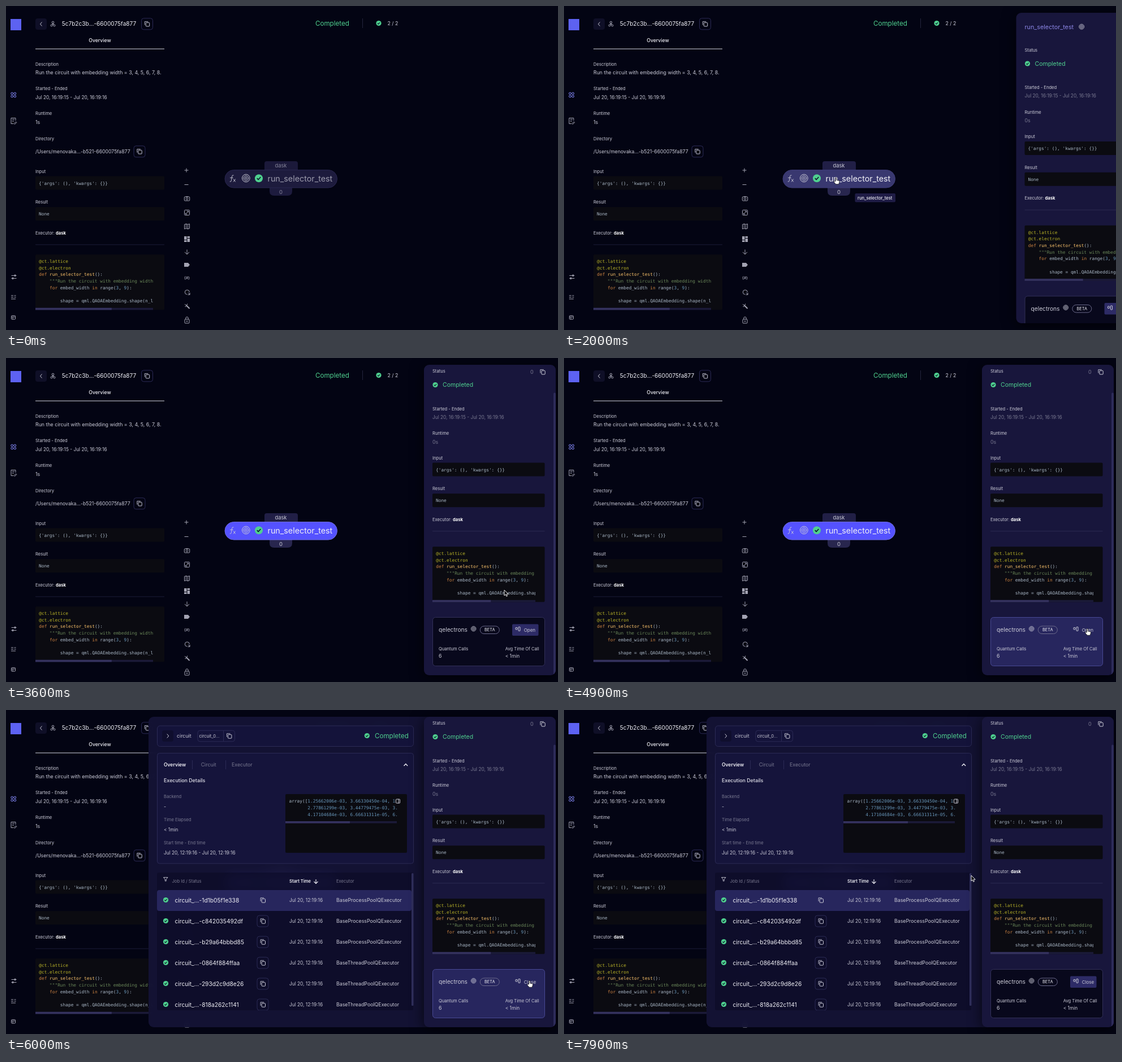
Recreate the animation shown at these times as an HTML page. Size 976x574 px, loop 8000 ms.

```html
<!DOCTYPE html>
<html lang="en">
<head>
<meta charset="utf-8">
<title>Workflow dashboard</title>
<style>
html, body { margin: 0; width: 976px; height: 574px; overflow: hidden; background: #030413; }
body { position: relative; }
svg { display: block; font-family: Inter, sans-serif; }
text { white-space: pre; }
#base, #pane, #panel, #pointer { position: absolute; }
#base, #pointer { left: 0; top: 0; }
#pane, #panel { top: 12px; height: 550px; overflow: hidden; border-radius: 9px; }
#pane { left: 252px; width: 720px; background: rgba(21, 20, 54, .93); backdrop-filter: blur(9px); }
#panel { left: 739px; width: 233px; background: #18163c; box-shadow: 0 4px 24px #000a; }
.mono { font-family: "DejaVu Sans Mono", monospace; fill: #a9b7c6; }
.dec { fill: #bbb529; } .key { fill: #cc8242; } .fn { fill: #ffc66d; }
.str { fill: #6a8759; } .num { fill: #6897bb; }
</style>
</head>
<body>
<svg id="base" width="976" height="574"></svg>
<div id="pane"></div>
<div id="panel"></div>
<svg id="pointer" width="976" height="574"></svg>
<script>
const $ = id => document.getElementById(id);
const WHITE = '#f0f0f6', LIGHT = '#cbcbd7', GRAY = '#797990', GREEN = '#4fd08f', LINE = '#2b2a55', BLACK = '#0b0b11';

// Drawing helpers; y of a text is the middle of its capitals
const text = (x, y, s, size = 8.8, fill = LIGHT, extra = '') =>
  `<text x="${x}" y="${y + size * .36}" font-size="${size}" fill="${fill}" ${extra}>${s}</text>`;
const label = (x, y, s, fill = LIGHT) => text(x, y, s, 7.6, fill);
const mono = (x, y, s) => text(x, y, s, 7.8, '', 'class="mono"');
const rect = (x, y, w, h, fill, r = 0, extra = '') =>
  `<rect x="${x}" y="${y}" width="${w}" height="${h}" rx="${r}" fill="${fill}" ${extra}/>`;
const frame = (x, y, w, h, r = 4, stroke = LINE, fill = 'none') => rect(x, y, w, h, fill, r, `stroke="${stroke}"`);
const path = (d, stroke = '#a3a3b2', w = 1, fill = 'none') =>
  `<path d="${d}" stroke="${stroke}" stroke-width="${w}" fill="${fill}"/>`;
const ring = (x, y, r, stroke = '#a3a3b2', w = 1) =>
  `<circle cx="${x}" cy="${y}" r="${r}" fill="none" stroke="${stroke}" stroke-width="${w}"/>`;
const target = (x, y, r, w = .8) => [1, .63, .27].map(k => ring(x, y, r * k, LIGHT, w)).join('');
const check = (x, y, r = 4.6) => `<circle cx="${x}" cy="${y}" r="${r}" fill="${GREEN}"/>` +
  path(`M${x - r * .45} ${y}l${r * .32} ${r * .34} ${r * .6}-${r * .66}`, '#0c1a2c', r * .24);
const copy = (x, y) => path(`M${x - 4.2} ${y + 1.8}v-6h6`, LIGHT, .9) + frame(x - 2.2, y - 2.4, 6.4, 6.6, 1, LIGHT);
const copyButton = (x, y) => frame(x - 10, y - 10, 20, 20, 4, LINE) + copy(x, y);
const clip = (x, y, w, h, body) => `<svg x="${x}" y="${y}" width="${w}" height="${h}" overflow="hidden">${body}</svg>`;
const tag = (cls, s) => `<tspan class="${cls}">${s}</tspan>`;

const CODE = [
  tag('dec', '@ct.lattice'), tag('dec', '@ct.electron'),
  tag('key', 'def ') + tag('fn', 'run_selector_test') + '():',
  tag('str', '    """Run the circuit with embedding width = 3, 4'),
  `    ${tag('key', 'for')} embed_width ${tag('key', 'in')} range(${tag('num', 3)}, ${tag('num', 9)}):`,
  '', '        shape = qml.QAOAEmbedding.shape(n_layers'];
const scrollBar = (x, y, w, thumb) => rect(x, y, w, 3.6, '#1b1a38') + rect(x, y, thumb, 3.6, '#35325f');
const codeBox = (x, y, w, view) => rect(x, y, w, 98, BLACK, 2) +
  clip(x, y, view, 94, CODE.map((s, i) => mono(6.3, 12 + i * 11.68, s)).join('')) +
  scrollBar(x, y + 94.5, view, view * view / 321);
const runInfo = (x, y, w, view, codeY, lineColor) =>
  label(x, y, 'Input') + rect(x, y + 8.8, w, 24, BLACK, 2) + mono(x + 6, y + 21, "{'args': (), 'kwargs': {}}") +
  label(x, y + 54.7, 'Result') + rect(x, y + 63.5, w, 24, BLACK, 2) + mono(x + 6, y + 75.5, 'None') +
  label(x, y + 109.3, `Executor: <tspan font-weight="700" fill="#fff">dask</tspan>`) +
  rect(x, y + 129.5, w, 1, lineColor) + codeBox(x, codeY, w, view);
const times = (x, y, fill, hour = 16, start = 15) =>
  text(x, y, `Jul 20, ${hour}:19:${start} - Jul 20, ${hour}:19:16`, 8.3, fill);

const sideIcons =
  rect(8, 23, 19, 20, '#5d62f2') +
  [[10.7, 155], [15.8, 155], [10.7, 160], [15.8, 160]].map(([x, y]) => ring(x, y, 1.9, '#8287f5')).join('') +
  path('M17 203v-4.500h-8v10h4M11 201h4M11 204h3M13.500 209l4-4 1.300 1.300-4 3.700') +
  path('M9.500 477.500h9M9.500 482.500h9') + ring(16, 477.5, 1.4) + ring(12, 482.5, 1.4) +
  path('M9 513h4M9 516h4M9 519h8M14.500 513h3M14.500 516h3') +
  frame(9.5, 548.5, 7, 6.5, 1, '#a3a3b2') + path('M9.500 550.800h7M12 551v4');

const toolIcons =
  path('M315.500 291h7M319 287.500v7M315.500 316.500h7') +
  frame(315.3, 338, 9.4, 7, 1, '#a3a3b2') + ring(320, 341.5, 1.8) + path('M318 337.500h4') +
  frame(315.5, 361.5, 9, 9, 1, '#a3a3b2') + path('M317.500 367v2h2M320.500 363.500h2v2M317.500 369l5-5.500') +
  path('M315.500 387l3-1 3 1 3-1v8l-3 1-3-1-3 1zM318.500 386v8M321.500 387v8') +
  rect(315, 408, 4.5, 6, '#a3a3b2') + rect(315, 415, 4.5, 3, '#a3a3b2') + rect(320.5, 408, 4.5, 3, '#a3a3b2') + rect(320.5, 412, 4.5, 6, '#a3a3b2') +
  path('M320 431.500v8.500M316 436l4 4 4-4') +
  path('M315 455h7l3 3.500-3 3.500h-7z', 'none', 0, '#a3a3b2') +
  text(320, 482, '{#}', 6.5, '#a3a3b2', 'text-anchor="middle" font-weight="600"') +
  path('M324.300 507a4 4 0 1 0-4 4M322 508l3 3M325 508v3.500h-3.500') +
  path('M318 529.500l6.500 6.500', '#a3a3b2', 2) + path('M316 528l1.500 1.500M320.500 527.500v2M316.500 532.500h2') +
  frame(316, 555, 8, 7, 1, '#a3a3b2') + path('M317.800 555v-2a2.200 2.200 0 0 1 4.400 0v2') + ring(320, 558.5, .8);

const node =
  `<path id="tagTop" d="M457 290v-11q0-4 4-4h51q4 0 4 4v11z"/>
   <path id="tagBottom" d="M466 322h40v6q0 8-8 8h-24q-8 0-8-8z"/>` +
  rect(387, 290.5, 198.5, 31.5, '', 15.7, 'id="pill"') +
  path('M402.500 300q-2.500-1.200-3 2l-1.200 7.500q-.4 2.500-2.600 1.500M396 304.300h5.500M402 306.500l3.700 5M405.700 306.500l-3.700 5', LIGHT, .9) +
  target(424.3, 305, 6.8, 1) + check(447, 305.2, 7) + '<g id="nodeText">' +
  text(486, 283, 'dask', 9.3, LIGHT, 'text-anchor="middle"') + text(486, 329.3, '0', 9.5, LIGHT, 'text-anchor="middle"') +
  text(462.5, 306.3, 'run_selector_test', 14.3, WHITE) + '</g>';

$('base').innerHTML = sideIcons + toolIcons +
  rect(52, 22, 20, 20, '#0f0f27', 4) + path('M63.500 28.500l-3 3.500 3 3.500', LIGHT) +
  ring(83, 29, 1.8) + ring(80.5, 34.5, 1.6) + ring(85.5, 34.5, 1.6) + path('M83 31v3M81 32l4 0') +
  text(98.7, 31.7, '5c7b2c3b...-6600075fa877', 10.1, WHITE) + copyButton(249.5, 31.8) +
  text(166, 61, 'Overview', 8.7, WHITE, 'text-anchor="middle" font-weight="500"') + rect(52, 75.5, 228, 1, '#d5d5de') +
  label(52, 103, 'Description') + text(52, 118.3, 'Run the circuit with embedding width = 3, 4, 5, 6, 7, 8.') +
  label(52, 146.7, 'Started - Ended') + times(52, 161.8, LIGHT) +
  label(52, 190, 'Runtime') + text(52, 206.3, '1s') +
  label(52, 235.7, 'Directory') + text(52, 257.5, '/Users/menovaka...-b521-6600075fa877', 8.7) + copyButton(236, 257.8) +
  runInfo(52, 292.8, 228, 208, 440.3, '#1b1b35') +
  text(547, 30.5, 'Completed', 11.6, GREEN) + rect(630, 22, 1, 17, '#24243c') + check(659, 30.5) + text(674.5, 30.7, '2 / 2') +
  node + `<g id="tip">${rect(514.5, 332, 71.5, 15.5, '#1f1c46', 2) + text(519, 339.8, 'run_selector_test', 7.5, WHITE, 'font-weight="500"')}</g>`;

// Job list pane
const JOBS = ['1d1b05f1e338', 'c842035492df', 'b29a64bbbd85', '0864f884ffaa', '293d2c9d8e26', '818a262c1141'];
const jobRow = (id, i) => {
  const y = 337 + i * 37;
  return (i ? rect(444, y - 10, 20, 20, 'none', 4, `stroke="${LINE}"`) : rect(267, 319, 450, 37, '#27265d', 4)) +
    check(282.5, y - .5) + text(298.5, y, `circuit_...-${id}`, 10.2, WHITE) + copy(454.3, y) +
    text(501, y, 'Jul 20, 12:19:16', 8.3) + text(584, y, `Base${i < 3 ? 'Process' : 'Thread'}PoolQExecutor`);
};
const ARRAY = [['array([', '1.25662006e-03, 3.66330450e-04, 1.'],
  ['       ', '2.77861299e-03, 3.44779475e-03, 3.'], ['       ', '4.17104684e-03, 6.66631311e-05, 6.']];

$('pane').innerHTML = `<svg width="720" height="550" viewBox="252 12 720 550">` +
  frame(267.5, 28, 453, 36.5, 5, LINE, '#14133a') + rect(276, 36, 20, 20, '#0f0e2d', 4) + path('M284.700 42.500l3 3.500-3 3.500', LIGHT) +
  text(302, 46, 'circuit') + frame(339, 36.3, 65.5, 19.5) + rect(384, 36.3, 1, 19.5, LINE) +
  text(341.5, 46, 'circuit_0...', 7.5) + copy(394.7, 46) + check(638.3, 45.5) + text(652, 45.7, 'Completed', 11.6, GREEN) +
  frame(267.5, 76.5, 453, 195.5, 4, LINE, '#15143b') +
  text(279, 97.3, 'Overview', 8.5, WHITE, 'font-weight="600"') + text(344.7, 97.3, 'Circuit', 8.8, GRAY) + text(399, 97.3, 'Executor', 8.8, GRAY) +
  rect(329, 89, 1, 16, LINE) + rect(388, 89, 1, 16, LINE) + path('M703.500 99l3.300-3.500 3.300 3.500', WHITE, 1.3) +
  text(279, 125, 'Execution Details', 8.8, LIGHT, 'font-weight="600"') +
  label(279, 153.3, 'Backend', GRAY) + text(279, 171, '-') + label(279, 194.3, 'Time Elapsed', GRAY) + text(279, 212, '&lt; 1min', 8.3) +
  label(279, 235.3, 'Start time - End time', GRAY) + times(279, 253, LIGHT, 12, 16) +
  rect(494, 149, 215, 104, BLACK, 2) +
  clip(494, 149, 197, 50, ARRAY.map(([a, b], i) => mono(6.5, 12.3 + i * 11.7, a + tag('num', b))).join('')) +
  scrollBar(494, 197, 197, 114) + frame(689.5, 158, 7, 7, 1, LIGHT, BLACK) + path('M694 158v7', LIGHT) +
  rect(267, 288, 453, 244, '#0b0b26', 3, 'opacity=".6"') + path('M278.500 296.500h7.500l-2.800 3.500v3h-1.900v-3z', LIGHT, .9) +
  label(293.5, 303.3, 'Job Id / Status', GRAY) + text(501, 303.5, 'Start Time', 7.6, WHITE, 'font-weight="600"') +
  path('M548 300v7.500M544.500 304l3.500 3.500 3.500-3.500', WHITE, 1.1) + label(584, 303.5, 'Executor', GRAY) +
  `<svg x="252" y="288" width="487" height="244" viewBox="252 288 487 244">${JOBS.map(jobRow).join('')}</svg>` +
  rect(717, 289, 3.5, 235, '#302f5c', 1.5) + '</svg>';

// Details panel
$('panel').innerHTML = `<svg width="233" height="550" viewBox="739 12 233 550"><g id="content">` +
  text(754, 36.7, 'run_selector_test', 10.8, '#8c86e6') + target(854.7, 36.7, 4.5) + path('M941.800 30.200l7 7M948.800 30.200l-7 7', LIGHT) +
  label(754, 78, 'Status') + text(927, 79.3, '0', 9, GRAY) + copy(949, 79.3) + check(759, 102) + text(772, 102, 'Completed', 10.5, GREEN) +
  label(754, 144.5, 'Started - Ended') + times(754, 159.5, GRAY) + label(754, 188, 'Runtime') + text(754, 203, '0s', 8.8, GRAY) +
  runInfo(754, 231.3, 198.5, 182, 388.8, '#2c2a52') +
  rect(754.5, 514, 198, 86, '', 5, 'id="card"') +
  text(765, 536.2, 'qelectrons', 10.2, LIGHT) + target(826.7, 534.2, 4.3) +
  frame(838.3, 529.5, 34, 13.5, 6.7, '#6c6b8c') + text(855.3, 536.3, 'BETA', 7.4, WHITE, 'text-anchor="middle"') +
  rect(895, 526, 46.5, 20.5, '#2d2b66', 2, 'id="button"') + frame(901, 532, 3, 3.5, .5, LIGHT) + frame(906, 531, 3, 7, .5, LIGHT) +
  text(915.7, 536.3, '', 8, LIGHT, 'id="action"') +
  label(765, 569.8, 'Quantum Calls') + text(765, 582.3, '6') + label(882.7, 569.8, 'Avg Time Of Call') + text(882.7, 582.3, '&lt; 1min', 8.3) +
  `</g>${rect(968, 12, 4, 501, '#2e2c5a', 2, 'id="thumb"')}</svg>`;

$('pointer').innerHTML =
  `<path id="arrow" d="M0 0v10l2.300-2.200 1.500 3.500 1.700-.7-1.500-3.400h3.200z" fill="#08080c" stroke="#fff" stroke-width=".9"/>
   <path id="hand" d="M-1 6V.5a1 1 0 0 1 2 0V4l4 .8q1 .3 1 1.500l-.5 2.700-1 2.200h-5l-3.300-4.200q-.5-1 .5-1.200z" fill="#fff" stroke="#111" stroke-width=".8"/>`;

// Piecewise linear value of [time, ...values] keys
function at(keys, t) {
  const i = keys.findIndex(k => k[0] > t);
  if (i < 1) return keys.at(i).slice(1);
  const a = keys[i - 1], b = keys[i], f = (t - a[0]) / (b[0] - a[0]);
  return a.slice(1).map((v, j) => v + (b[j + 1] - v) * f);
}
const rgb = c => `rgb(${c.map(Math.round)})`;

// cubic-bezier(0, 0, .2, 1) over 225 ms
function slide(t) {
  const x = Math.min(1, Math.max(0, t / 225));
  let lo = 0, hi = 1;
  for (let i = 0; i < 24; i++) {
    const s = (lo + hi) / 2;
    if (.6 * s * s * (1 - s) + s ** 3 < x) lo = s; else hi = s;
  }
  return x === 1 ? 1 : lo * lo * (3 - 2 * lo);
}

const POINTER = [[300, 549, 131], [400, 530, 189], [500, 530, 189], [600, 512, 250], [700, 471, 314], [900, 471, 314],
  [1000, 481, 304.5], [2100, 481, 304.5], [2500, 925, 322], [2700, 952, 332], [3100, 952, 332], [3500, 881, 411],
  [3900, 881, 411], [4200, 925.5, 480], [6800, 925.5, 480], [7100, 830, 425], [7200, 800, 400], [7400, 720, 293]];
const PILL = [[1000, 29, 27, 61], [1200, 57, 56, 112], [2020, 57, 56, 112], [2200, 85, 82, 255]];
const EDGE = [[1000, 40, 38, 78], [1200, 62, 61, 120], [2020, 62, 61, 120], [2200, 110, 108, 230]];
const TOP = [[1000, 27, 25, 58], [1200, 33, 31, 70]];
const BOTTOM = [[1000, 29, 27, 62], [1200, 40, 38, 78]];
const SCROLL = [[2700, 0], [2800, 11.7], [3100, 46], [3300, 54.5]];
const CARD_HOVER = [[4050, 0], [4200, 1], [6850, 1], [7000, 0]];

function draw() {
  const t = performance.now() % 8000;
  $('pill').setAttribute('fill', rgb(at(PILL, t)));
  $('pill').setAttribute('stroke', rgb(at(EDGE, t)));
  $('tagTop').setAttribute('fill', rgb(at(TOP, t)));
  $('tagBottom').setAttribute('fill', rgb(at(BOTTOM, t)));
  $('nodeText').setAttribute('opacity', at([[1000, .6], [1200, 1]], t)[0]);
  $('tip').setAttribute('opacity', at([[1150, 0], [1300, 1], [2100, 1], [2250, 0]], t)[0]);

  $('panel').style.transform = `translateX(${270 * (1 - slide(t - 1906))}px)`;
  $('pane').style.transform = `translateX(${724 * (1 - slide(t - 5503))}px)`;
  const [scroll] = at(SCROLL, t), [hover] = at(CARD_HOVER, t);
  $('content').setAttribute('transform', `translate(0 ${-scroll})`);
  $('thumb').setAttribute('y', 12 + scroll * .91);
  $('card').setAttribute('fill', rgb([8 + 31 * hover, 8 + 30 * hover, 28 + 66 * hover]));
  $('card').setAttribute('stroke', rgb([50 + 22 * hover, 48 + 24 * hover, 88 + 60 * hover]));
  $('button').setAttribute('opacity', 1 - hover);
  $('action').textContent = t < 5500 ? 'Open' : 'Close';

  const hand = t >= 1000 && t < 2150 || hover > .5;
  const [x, y] = at(POINTER, t);
  $('pointer').style.display = t < 300 ? 'none' : '';
  $('arrow').style.display = hand ? 'none' : '';
  $('hand').style.display = hand ? '' : 'none';
  for (const id of ['arrow', 'hand']) $(id).setAttribute('transform', `translate(${x} ${y})`);
  requestAnimationFrame(draw);
}
draw();
</script>
</body>
</html>
```
